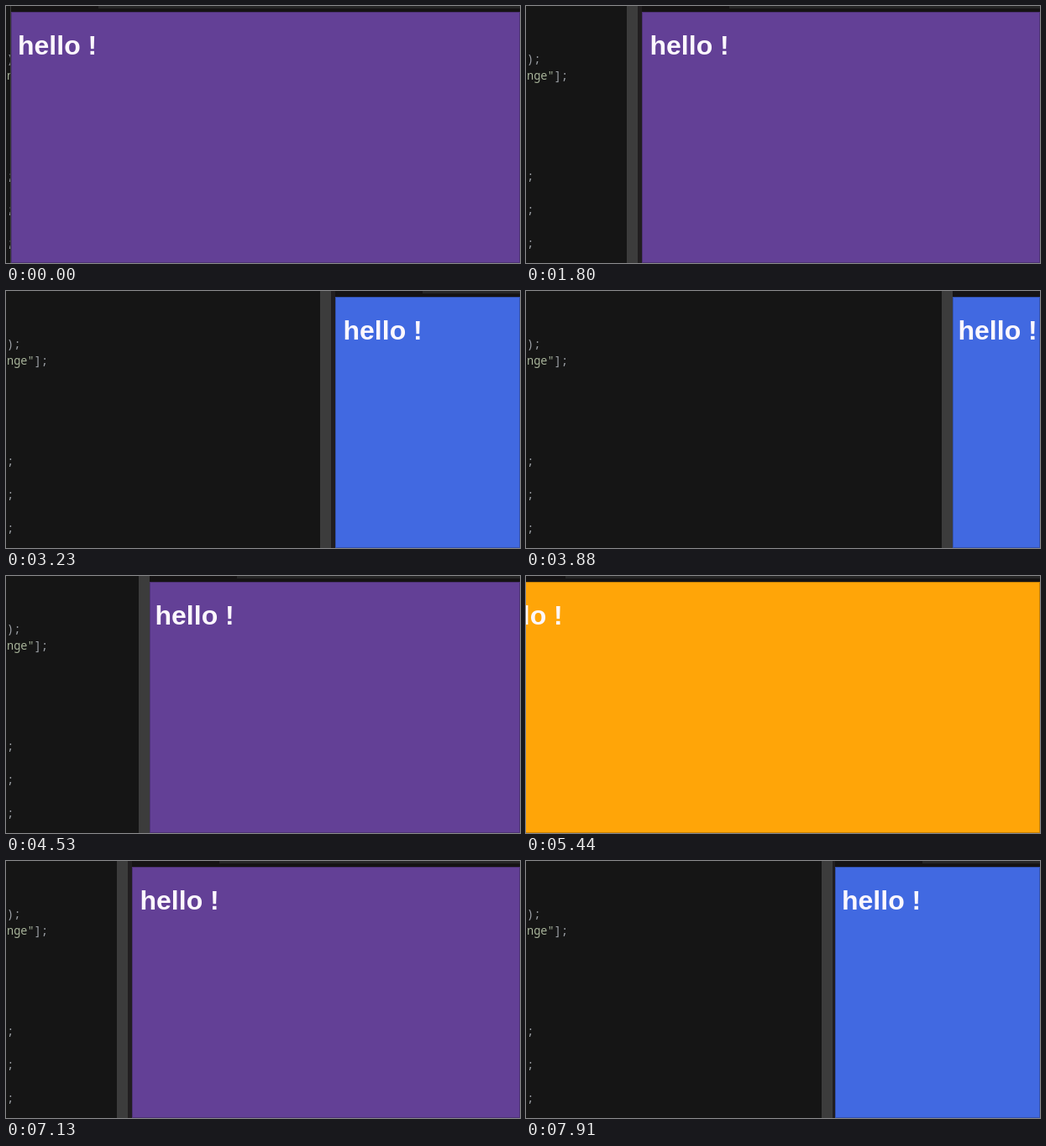
An HTML page for the animation above (8000 ms loop, 612 px wide and 307 px high).

```html
<!DOCTYPE html>
<html lang="en">
<head>
<meta charset="utf-8">
<title>Resizable preview pane</title>
<style>
  html, body { margin: 0; width: 100%; height: 100%; overflow: hidden; background: #151515; }
  #stage { position: relative; width: 612px; height: 307px; overflow: hidden; background: #151515; }
  #stage div { position: absolute; top: 0; }
  #code { left: 0; height: 307px; overflow: hidden; }
  #code pre { position: absolute; left: 1px; top: 53px; margin: 0; font: 13.6px/20px "Noto Sans Mono", "DejaVu Sans Mono", monospace; color: #a0a4aa; }
  #code i { font-style: normal; color: #a8b49a; }
  #gutter { width: 26px; height: 307px; background: linear-gradient(90deg, #3c3c3c 13px, #211e20 13px); }
  #pane { right: 0; height: 307px; background: #151314; overflow: hidden; }
  #tab { left: 104px; right: 0; height: 3px; background: #252525; }
  #stage #page { left: 0; top: 7px; right: 0; bottom: 0; box-shadow: inset 0 0 0 1px rgba(0, 0, 0, .22); }
  #stage #hello { top: 27px; font: bold 32px/40px "Liberation Sans", Arial, sans-serif; color: #fcf7fd; white-space: pre; }
</style>
</head>
<body>
<div id="stage">
  <div id="code"><pre>);
<i>nge"</i>];





;

;

;</pre></div>
  <div id="gutter"></div>
  <div id="pane">
    <div id="tab"></div>
    <div id="page"></div>
    <div id="hello">hello !</div>
  </div>
</div>
<script>
  const LOOP = 8000, TICK = 130, START = 500;
  const linear = p => p;
  const easeOut = p => 1 - (1 - p) ** 3;

  // Drag of the pane's left edge
  const DRAG = [
    { t: 370, x: 6 },
    { t: 760, x: 14 },
    { t: 1150, x: 14 },
    { t: 1800, x: 138 },
    { t: 3880, x: 508 },
    { t: 4530, x: 171 },
    { t: 5960, x: -68, ease: easeOut },
    { t: 6350, x: -68 },
    { t: 7910, x: 368 }
  ];

  const el = id => document.getElementById(id);
  const code = el("code"), gutter = el("gutter"), pane = el("pane");
  const page = el("page"), hello = el("hello");
  const clamp = (v, lo, hi) => Math.min(hi, Math.max(lo, v));

  function edgeAt(t) {
    const n = DRAG.findIndex(k => k.t > t);
    if (n < 0) return DRAG[DRAG.length - 1].x;
    if (n === 0) return DRAG[0].x;
    const a = DRAG[n - 1], b = DRAG[n], ease = b.ease || linear;
    return a.x + (b.x - a.x) * ease((t - a.t) / (b.t - a.t));
  }

  const colorAt = x => x < -10 ? "#ffa508" : x < 200 ? "#634096" : "#4169e1";

  function draw(now) {
    const t = now % LOOP;
    const held = t < START ? 0 : START + Math.floor((t - START) / TICK) * TICK;
    const x = Math.round(edgeAt(held));
    // The gutter and the text trail the drag a little
    const dir = Math.sign(edgeAt(held + TICK) - edgeAt(held));
    const gap = clamp(2 * (x - 6), 1, 16 + 2.5 * dir);
    const g = Math.round(x - gap);
    code.style.width = Math.max(0, g) + "px";
    gutter.style.left = g + "px";
    pane.style.left = x + "px";
    hello.style.left = 8 + 1.5 * dir + "px";
    page.style.background = colorAt(x);
    requestAnimationFrame(draw);
  }
  draw(0);
</script>
</body>
</html>
```
